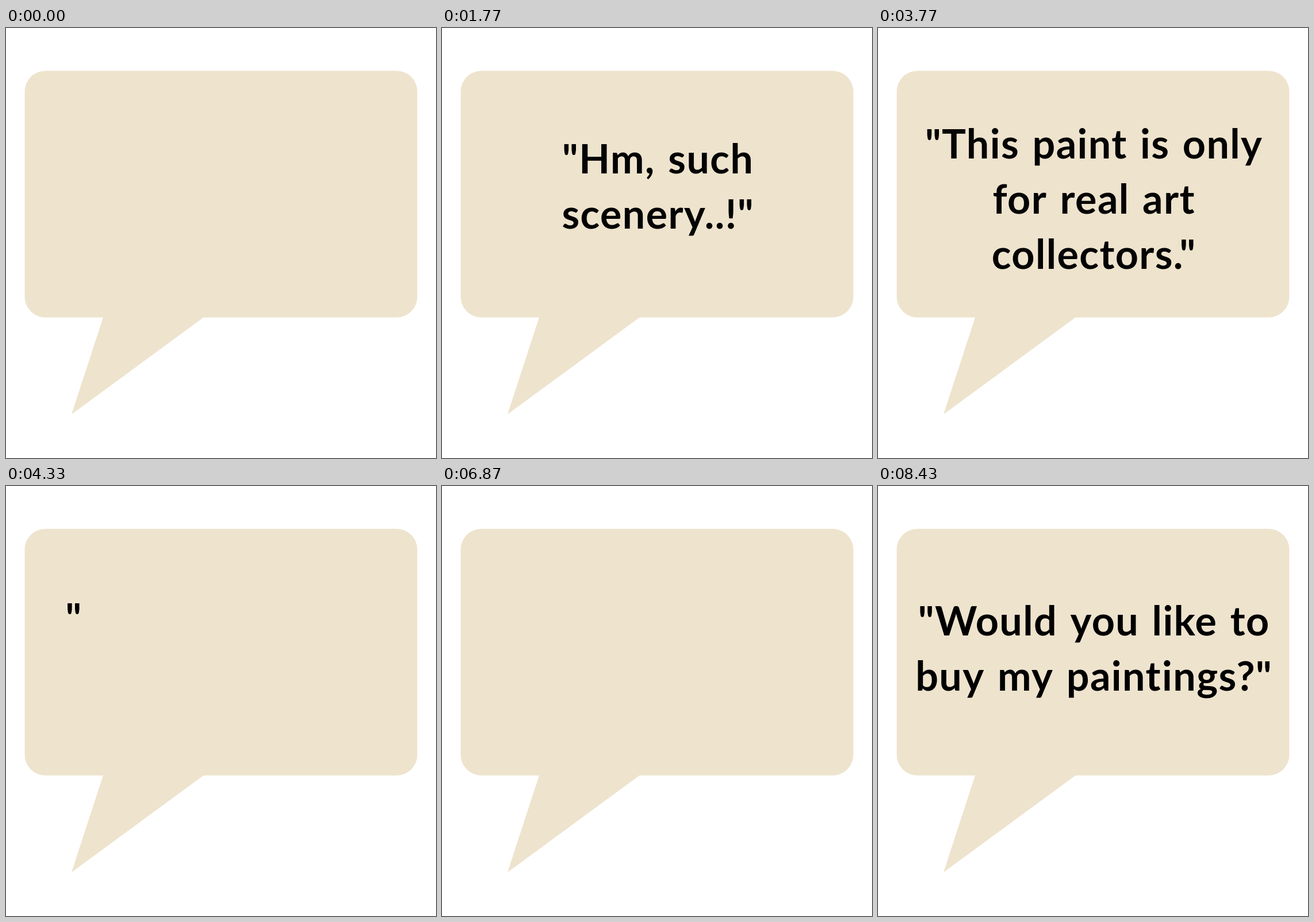
Recreate the animation shown at these times as an HTML page with a canvas. Size 748 px wide and 748 px high, loop 9670 ms.

```html
<!DOCTYPE html>
<html lang="en">
<head>
<meta charset="utf-8">
<title>Speech bubble</title>
<style>
  html, body { margin: 0; width: 100%; height: 100%; overflow: hidden; background: #fff; }
  canvas { display: block; width: 748px; height: 748px; }
</style>
</head>
<body>
<canvas id="stage" width="748" height="748"></canvas>
<script>
const ctx = document.getElementById('stage').getContext('2d');

const LOOP = 9670;
const STEP = 1000 / 30;
const CENTER = 375;
const LINE = 96;
const TRACKING = 1.4;
const WORD_GAP = 4;
const SETTLE = 14;     // letter drop length, in staggers
const FADE = 420;

// start and out in ms, gap = delay between letters, y = first baseline
const phrases = [
  { start: 10, gap: 30, out: 1762, y: 253, lines: ['"Hm, such', 'scenery..!"'] },
  { start: 2561, gap: 12.5, out: 3760, y: 227, lines: ['"This paint is only', 'for real art', 'collectors."'] },
  { start: 4317, gap: 33, out: 6446, y: 271, lines: ['"I don\'t work for', 'exposure."'] },
  { start: 7385, gap: 20.6, out: Infinity, y: 260, lines: ['"Would you like to', 'buy my paintings?"'] }
];

ctx.font = '700 70px Lato, "Open Sans", sans-serif';
ctx.textBaseline = 'alphabetic';

const width = s => ctx.measureText(s).width;

function layoutLine(line) {
  let spaces = 0;
  const xs = [...line].map((ch, i) => {
    const x = width(line.slice(0, i + 1)) - width(ch) + i * TRACKING + spaces * WORD_GAP;
    if (ch === ' ') spaces++;
    return x;
  });
  const total = width(line) + (line.length - 1) * TRACKING + spaces * WORD_GAP;
  return xs.map(x => CENTER - total / 2 + x);
}

function layout(phrase) {
  let order = 0;
  phrase.letters = [];
  phrase.lines.forEach((line, row) => {
    const xs = layoutLine(line);
    [...line].forEach((ch, i) => {
      phrase.letters.push({ ch, x: xs[i], y: phrase.y + row * LINE, order: order++ });
    });
    order++;
  });
}

// Damped swing from above the baseline; age is counted in staggers
function drop(age) {
  if (age > SETTLE) return 0;
  return -20 * Math.exp(-0.315 * age) * Math.cos(0.714 * age);
}

function drawBubble() {
  ctx.fillStyle = '#eee3cd';
  ctx.beginPath();
  ctx.roundRect(32.5, 74.5, 683, 429, 36);
  ctx.fill();
  ctx.beginPath();
  ctx.moveTo(169.5, 502);
  ctx.lineTo(169, 503.5);
  ctx.lineTo(114, 672);
  ctx.lineTo(343.5, 503.5);
  ctx.lineTo(345, 502);
  ctx.fill();
}

function drawPhrase(p, t) {
  if (t < p.start || t >= p.out + FADE) return;
  ctx.globalAlpha = Math.min(1, 1 - (t - p.out) / FADE);
  ctx.fillStyle = '#000';
  for (const l of p.letters) {
    const age = (t - p.start) / p.gap - l.order;
    if (age >= 0) ctx.fillText(l.ch, l.x, l.y + drop(age));
  }
  ctx.globalAlpha = 1;
}

function draw(ms) {
  // Hold each pose for one step; the small lead absorbs timer rounding
  const t = Math.floor((ms % LOOP + 5) / STEP) * STEP;
  ctx.fillStyle = '#fff';
  ctx.fillRect(0, 0, 748, 748);
  drawBubble();
  phrases.forEach(p => drawPhrase(p, t));
}

phrases.forEach(layout);
let origin = null;
function tick(now) {
  if (origin === null) origin = now;
  draw(now - origin);
  requestAnimationFrame(tick);
}
draw(0);
requestAnimationFrame(tick);
</script>
</body>
</html>
```
